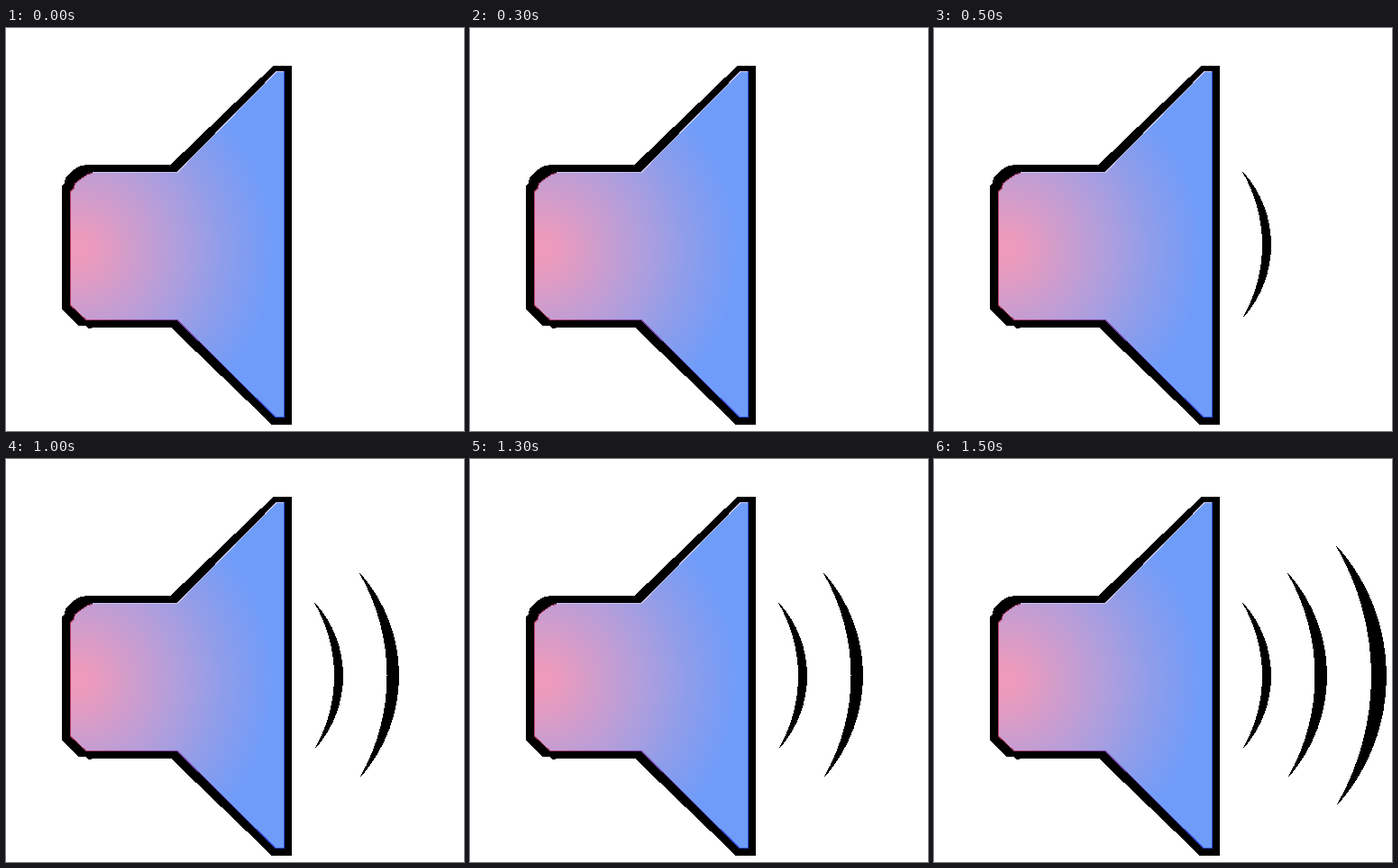
These frames come from a looping animation (508 by 448 pixels, 2000 ms). An HTML page:

```html
<!DOCTYPE html>
<html lang="en">
<head>
<meta charset="utf-8">
<title>Speaker</title>
<style>
  html, body { margin: 0; width: 100%; height: 100%; overflow: hidden; background: #fff; }
  svg { display: block; width: 100%; height: 100%; }
</style>
</head>
<body>
<svg viewBox="0 0 508 448" shape-rendering="crispEdges">
  <defs>
    <radialGradient id="glow" gradientUnits="userSpaceOnUse" cx="78" cy="246" r="218">
      <stop offset="0" stop-color="#ef9abb"/>
      <stop offset=".08" stop-color="#eb9bbd"/>
      <stop offset=".5" stop-color="#b29edb"/>
      <stop offset=".75" stop-color="#8e9dea"/>
      <stop offset="1" stop-color="#709cf9"/>
    </radialGradient>
    <linearGradient id="rim" gradientUnits="userSpaceOnUse" x1="72" y1="0" x2="309" y2="0">
      <stop offset="0" stop-color="#b8406c"/>
      <stop offset=".5" stop-color="#7a3fa0"/>
      <stop offset="1" stop-color="#2c50e8"/>
    </linearGradient>
  </defs>
  <path d="M296.5 42H317V441H295L183 333H97L92 334L88 331H80L62 313V175L65 172L66 167L74 158L83 153L90 152H182.5Z"/>
  <path fill="url(#glow)" d="M300 48H309V433H299L190 325H97L89 324L72 308V181L75 178L76 173L82 168L91 162L96 161H190Z"/>
  <g fill="none">
    <path stroke="url(#rim)" d="M96 161.5L91 162.5L82 168.5L76.5 173L75.5 178L72 181.5H71.5V308L89 324.5H190L299 432.5H308.5V48"/>
    <path stroke="#c9c4f0" d="M96 160.5H190L300 48.5H308"/>
  </g>
  <g id="waves"></g>
</svg>
<script>
const LOOP = 2000, STEP = 500;
// tip x, top, bottom, outer bulge x, inner bulge x
const waves = [
  [342, 160, 321, 374, 364],
  [392, 127, 353, 436, 422.5],
  [446, 97, 384, 502, 485]
];

function radius(half, sag) {
  return (half * half + sag * sag) / (2 * sag);
}

function crescent([x, top, bottom, outer, inner]) {
  const half = (bottom - top) / 2;
  const ro = radius(half, outer - x - 1.5);
  const ri = radius(half, inner - x - 0.5);
  return `M${x + 1} ${top}A${ro} ${ro} 0 0 1 ${x + 2} ${bottom}` +
    `H${x + 1}A${ri} ${ri} 0 0 0 ${x} ${top}Z`;
}

const arcs = waves.map(w => {
  const p = document.createElementNS("http://www.w3.org/2000/svg", "path");
  p.setAttribute("d", crescent(w));
  return document.getElementById("waves").appendChild(p);
});

function draw(now) {
  const shown = Math.floor((now % LOOP) / STEP);
  arcs.forEach((a, i) => a.setAttribute("visibility", i < shown ? "visible" : "hidden"));
}

const start = performance.now();
function tick() {
  draw(performance.now() - start);
  requestAnimationFrame(tick);
}
tick();
</script>
</body>
</html>
```
